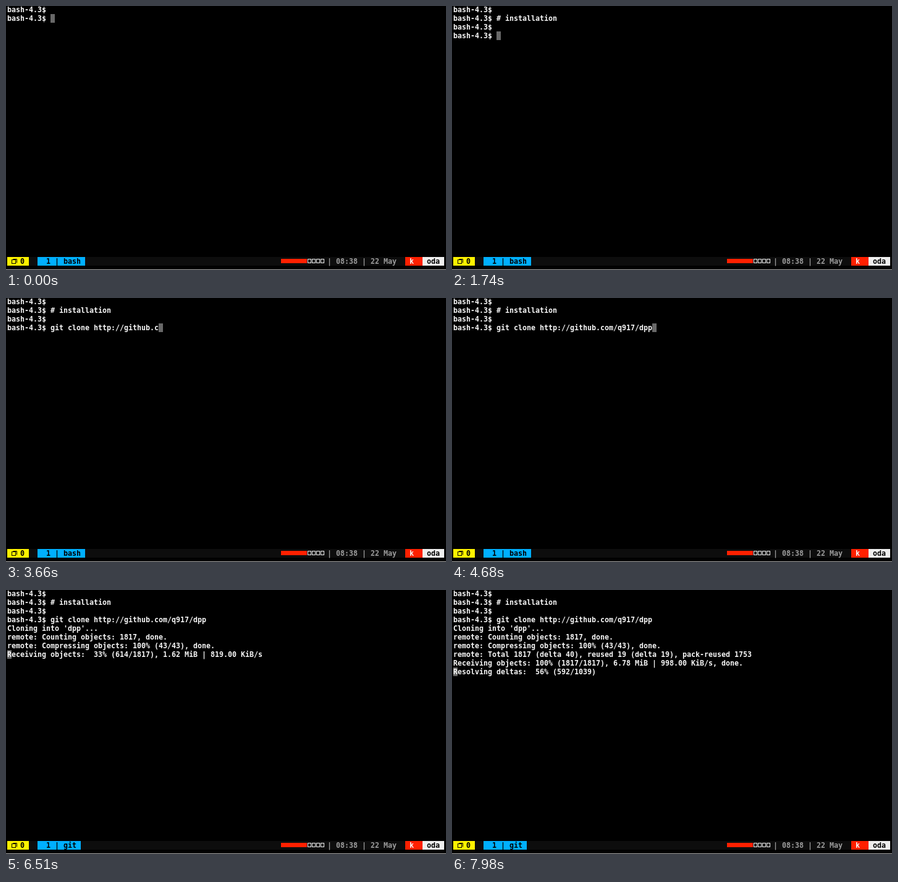
An HTML page with a canvas for the animation above (8000 ms loop, 712 by 426 pixels).

```html
<!DOCTYPE html>
<html lang="en">
<head>
<meta charset="utf-8">
<title>Terminal session</title>
<style>
  html, body { margin: 0; width: 100%; height: 100%; overflow: hidden; background: #000; }
  canvas { display: block; }
</style>
</head>
<body>
<canvas id="screen" width="712" height="426"></canvas>
<script>
const ctx = document.getElementById('screen').getContext('2d');
const LOOP = 8000, CELL = 7, ROW = 14, LEFT = 2;
const WHITE = '#f6f6f6', DIM = '#9c9c9c', RED = '#ff2000', CURSOR = '#686868';
const PROMPT = 'bash-4.3$ ';
const COMMENT = '# installation';
const COMMAND = 'git clone http://github.com/q917/dpp';
const OBJECTS = 1817, DELTAS = 1039;

// Piecewise linear value through [time, value] points, held at both ends.
function track(t, points) {
  if (t <= points[0][0]) return points[0][1];
  for (let i = 1; i < points.length; i++) {
    const [t0, a] = points[i - 1], [t1, b] = points[i];
    if (t < t1) return a + (b - a) * (t - t0) / (t1 - t0);
  }
  return points[points.length - 1][1];
}

const typed = (text, t, points) => text.slice(0, Math.floor(track(t, points)));

function progress(label, done, total) {
  const percent = String(Math.floor(done / total * 100)).padStart(3);
  return `${label}: ${percent}% (${done}/${total})`;
}

function receiving(t) {
  const count = Math.floor(track(t, [[5500, 0], [5730, 346], [7320, 892], [7800, OBJECTS]]));
  let line = progress('Receiving objects', count, OBJECTS);
  if (t >= 6100) {
    const step = Math.floor((t - 6100) / 500);
    const size = (1.62 + 1.32 * step).toFixed(2);
    const speed = [819, 861, 903, 945][step];
    line += `, ${size} MiB | ${speed}.00 KiB/s`;
  }
  return line;
}

// Returns the visible lines and the cursor column in the last one.
function session(t) {
  const lines = [PROMPT];
  const atPrompt = text => {
    lines.push(PROMPT + text);
    return { lines, column: PROMPT.length + text.length };
  };
  if (t < 1230) return atPrompt(typed(COMMENT, t, [[150, 0], [1080, 14]]));
  lines.push(PROMPT + COMMENT);
  if (t < 1470) return atPrompt('');
  lines.push(PROMPT);
  if (t < 4980) {
    return atPrompt(typed(COMMAND, t, [[1800, 0], [2700, 14], [4620, 36]]));
  }

  lines.push(PROMPT + COMMAND);
  if (t >= 5010) lines.push("Cloning into 'dpp'...");
  if (t >= 5340) lines.push(`remote: Counting objects: ${OBJECTS}, done.`);
  if (t >= 5430) lines.push('remote: Compressing objects: 100% (43/43), done.');
  if (t < 5500) lines.push('');
  else if (t < 7800) lines.push(receiving(t));
  else {
    lines.push('remote: Total 1817 (delta 40), reused 19 (delta 19), pack-reused 1753');
    lines.push('Receiving objects: 100% (1817/1817), 6.78 MiB | 998.00 KiB/s, done.');
    const resolved = Math.floor(track(t, [[7820, 0], [7980, 592]]));
    lines.push(progress('Resolving deltas', resolved, DELTAS));
  }
  return { lines, column: 0 };
}

function write(text, column, row, color) {
  ctx.fillStyle = color;
  [...text].forEach((char, i) => {
    ctx.fillText(char, LEFT + (column + i) * CELL, row * ROW + 10);
  });
}

function block(column, row, width, color) {
  ctx.fillStyle = color;
  ctx.fillRect(LEFT + column * CELL, row * ROW - 1, width * CELL, ROW);
}

function label(text, column, background, color) {
  block(column, 29, text.length, background);
  write(text, column, 29, color);
}

function statusBar(program) {
  block(0, 29, 101, '#0d0d0d');
  label('   0 ', 0, '#fff200', '#000');
  label(`  1 | ${program} `, 7, '#00afff', '#000');

  // Window icon: a sheet in front of another
  ctx.lineWidth = 1;
  ctx.strokeStyle = '#000';
  ctx.strokeRect(9.5, 409.5, 6, 6);
  ctx.beginPath();
  ctx.moveTo(11.5, 408.5);
  ctx.lineTo(17.5, 408.5);
  ctx.lineTo(17.5, 414.5);
  ctx.stroke();

  // Battery meter
  ctx.fillStyle = RED;
  ctx.fillRect(445, 408, 42, 7);
  ctx.strokeStyle = WHITE;
  for (let i = 0; i < 4; i++) ctx.strokeRect(488.5 + i * CELL, 408.5, 5, 6);

  write('| 08:38 | 22 May', 74, 29, DIM);
  label(' k  ', 92, RED, WHITE);
  label(' oda ', 96, '#eeeeee', '#000');
}

function draw(t) {
  ctx.fillStyle = '#000';
  ctx.fillRect(0, 0, 712, 426);
  ctx.font = 'bold 11.63px "DejaVu Sans Mono", monospace';
  const { lines, column } = session(t);
  block(column, lines.length - 1, 1, CURSOR);
  lines.forEach((line, row) => write(line, 0, row, WHITE));
  statusBar(t < 5250 ? 'bash' : 'git');

  // Lower window edge
  ctx.fillStyle = '#b0b0b0';
  ctx.fillRect(0, 425, 712, 1);
}

function tick() {
  draw(performance.now() % LOOP);
  requestAnimationFrame(tick);
}
tick();
</script>
</body>
</html>
```
